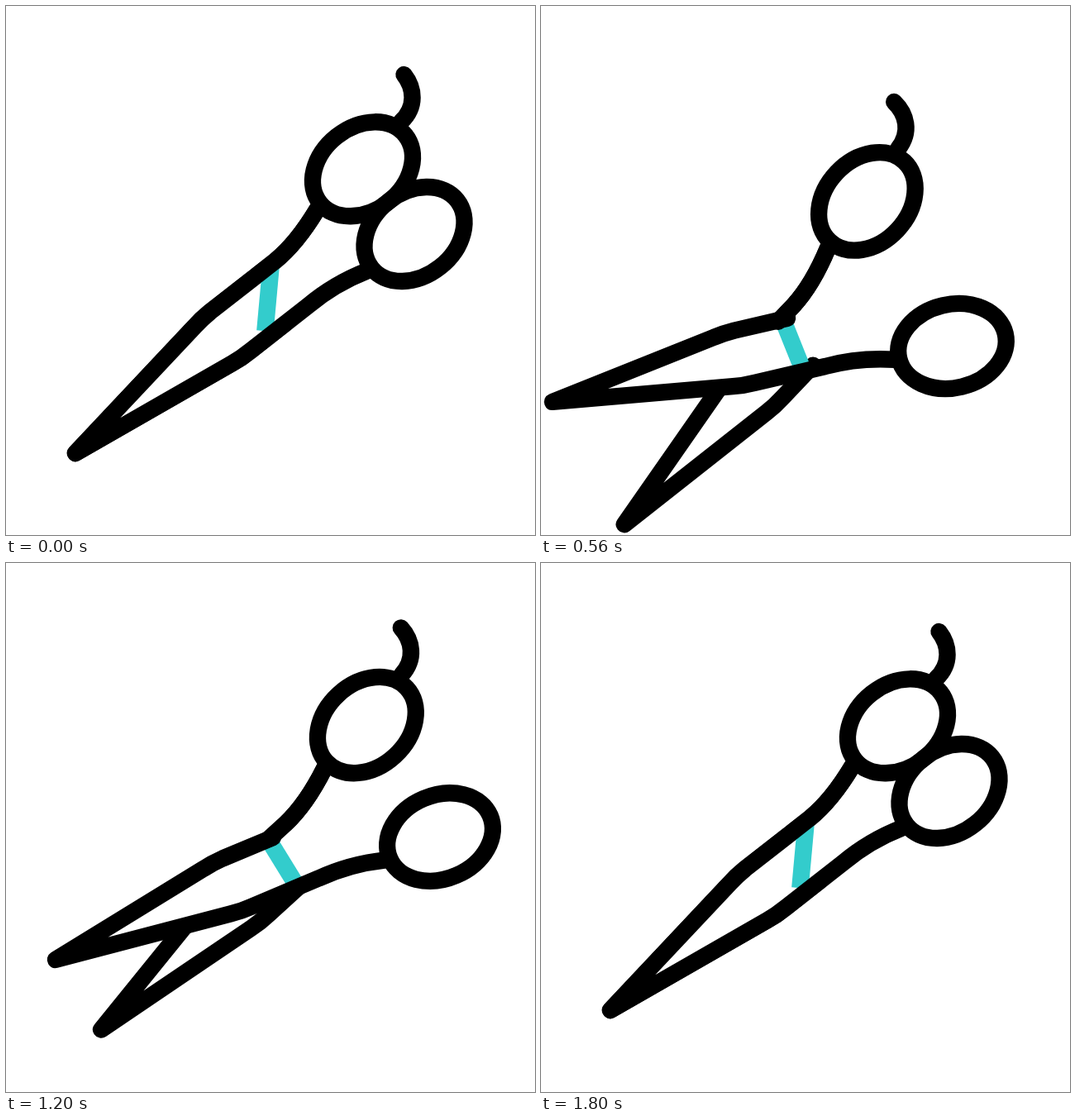
An HTML page with a canvas that plays this animation: 640 px wide and 640 px high, repeating every 2400 ms.

```html
<!DOCTYPE html>
<html lang="en">
<head>
<meta charset="utf-8">
<title>Scissors</title>
<style>
html, body { margin: 0; width: 100%; height: 100%; overflow: hidden; background: #fff; }
canvas { display: block; width: 100vmin; height: 100vmin; }
</style>
</head>
<body>
<canvas id="stage" width="640" height="640"></canvas>
<script>
const ctx = document.getElementById('stage').getContext('2d');
const LOOP = 2400, STEP = 20, END = 1800;
const RAD = Math.PI / 180;
const PIVOT = [318, 354];

// Shapes in the closed pose.
const upperBlade = new Path2D(
  'M338 384 L296 417 Q285 426 274 432 L84 541 L228 388 Q236 379 247 370 L325 309 Q352 287 376.5 246');
const upperShank = new Path2D('M304 325.5 L325 309 Q352 287 376.5 246');
const tail = new Path2D('M481.5 83 C494 99 497 122 478 140');
const lowerBlade = new Path2D(
  'M299 329.5 L247 370 Q236 379 228 388 L84 541 L274 432 Q285 426 296 417 L365 363 Q397 336 438 320');
const lowerFill = new Path2D(
  'M300 329 L247 370 Q236 379 228 388 L84 541 L274 432 Q285 426 296 417 L342 381 Z');

function ring(x, y) {
  const p = new Path2D();
  p.ellipse(x, y, 66, 50.5, -38.4 * RAD, 0, Math.PI * 2);
  return p;
}
const upperRing = ring(431.5, 197.3);
const lowerRing = ring(494, 276);

function ease(p) {
  p = Math.min(1, Math.max(0, p));
  return p < 0.5 ? 4 * p ** 3 : 1 - 4 * (1 - p) ** 3;
}

// Rises from 0 to 1 between a and b, falls back between c and d.
const pulse = (t, a, b, c, d) => ease((t - a) / (b - a)) - ease((t - c) / (d - c));

// Two snips: 0 at a, 1 at b, 0 at c, 1 at d, 0 at the end.
const snips = (t, a, b, c, d) => pulse(t, a, b, b, c) + pulse(t, c, d, d, END);

// The scissors drop from a resting spot to the open spot along a bent path.
const OPEN = [-13, 54], REST = [42.6, -37.5];
function place(t, s) {
  const inner = t > 550 && t < 1409;
  return OPEN.map((open, i) => {
    const home = inner ? REST[i] : 0;
    const bend = (inner ? 0.2 : -0.2) * REST[i];
    return home + (open - home) * s + bend * s * (1 - s);
  });
}

function turned(deg, draw) {
  ctx.save();
  ctx.translate(...PIVOT);
  ctx.rotate(deg * RAD);
  ctx.translate(-PIVOT[0], -PIVOT[1]);
  draw();
  ctx.restore();
}

function drawBar() {
  ctx.fillStyle = '#33cccc';
  ctx.fillRect(PIVOT[0] - 11.3, PIVOT[1] - 39.5, 20.6, 79);
}

function draw(t) {
  const drop = snips(t, 25, 550, 990, 1409);
  const upper = -8.4 * drop;
  const lower = 25.2 * snips(t, 52, 494, 975, 1394);
  const bar = 5.2 - 52 * pulse(t, 15, 560, 1375, END);

  ctx.fillStyle = '#fff';
  ctx.fillRect(0, 0, 640, 640);
  ctx.strokeStyle = '#000';
  ctx.lineWidth = 20.4;
  ctx.lineJoin = ctx.lineCap = 'round';

  ctx.save();
  ctx.translate(...place(t, drop));
  turned(upper, () => {
    ctx.stroke(upperBlade);
    ctx.stroke(upperRing);
    ctx.stroke(tail);
  });
  turned(lower, () => {
    ctx.fillStyle = '#fff';
    ctx.fill(lowerFill);
    turned(bar, drawBar);
    ctx.stroke(lowerBlade);
    ctx.stroke(lowerRing);
  });
  turned(upper, () => ctx.stroke(upperShank));
  ctx.restore();
}

const start = performance.now();
function tick() {
  const t = (performance.now() - start) % LOOP;
  draw(Math.floor(t / STEP) * STEP);
  requestAnimationFrame(tick);
}
tick();
</script>
</body>
</html>
```
